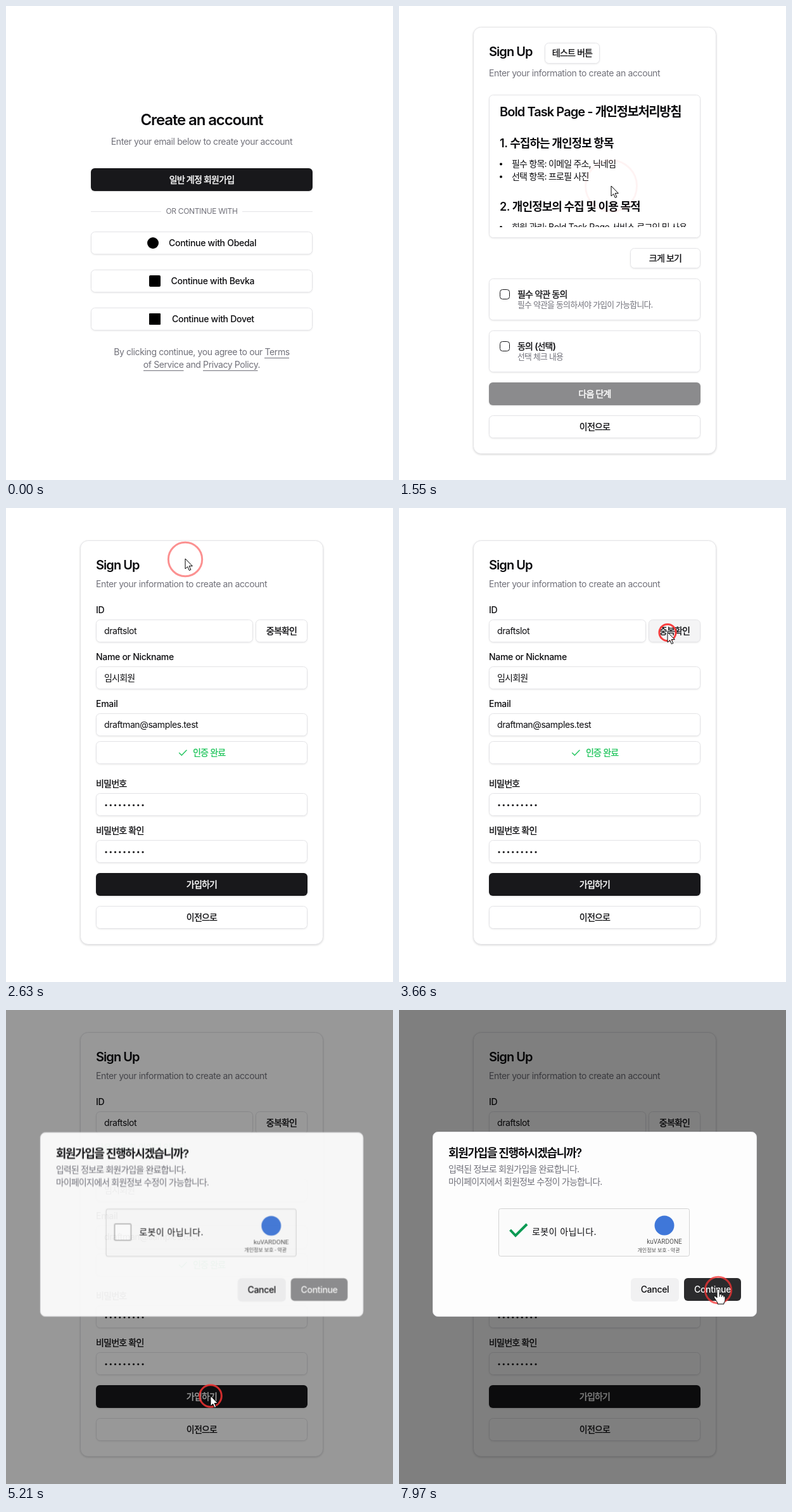
These frames come from a looping animation (611x748 px, 8000 ms). An HTML page:

```html
<!DOCTYPE html>
<html lang="ko">
<head>
<meta charset="utf-8">
<title>Sign up flow</title>
<style>
html, body { margin: 0; width: 100%; height: 100%; overflow: hidden; background: #fff; }
svg { display: block; width: 100vw; height: 100vh; }

/* type */
text { font: 400 14px Inter, "Noto Sans CJK KR", "Noto Sans CJK", sans-serif; letter-spacing: -.028em; fill: currentColor; color: #0c0c0f; }
.mid { text-anchor: middle; }
.m { font-weight: 500; letter-spacing: -.021em; }
.k { letter-spacing: -.056em; }
.k.m { stroke: currentColor; stroke-width: .3px; }
.k.m.white { stroke-width: .45px; }
.h1, .h2, .h3 { font-weight: 600; letter-spacing: -.047em; }
.h1 { font-size: 24px; }
.h2 { font-size: 20px; }
.h3 { font-size: 18px; letter-spacing: -.025em; }
.kt { letter-spacing: -.074em; }
.h3 .kt { letter-spacing: -.052em; }
.mute { color: #71717a; }
.white { color: #fff; }
.green { color: #22c55e; }
.desc { font-size: 12.8px; }
.robot { letter-spacing: .03em; }
.tiny { font-size: 10px; font-family: Roboto, sans-serif; letter-spacing: 0; color: #555; }
.tiny.kr { font-size: 8px; font-family: Roboto, "Noto Sans CJK KR", sans-serif; }

/* shapes */
.box { fill: #fff; stroke: #e4e4e7; filter: drop-shadow(0 1px 1px rgba(0,0,0,.08)); }
.card { filter: drop-shadow(0 1px 1.5px rgba(0,0,0,.16)); }
.dark { fill: #18181b; filter: drop-shadow(0 1px 1px rgba(0,0,0,.12)); }
.off { fill: #8b8b8d; }
.tick { fill: none; stroke: #18181b; }
.line { stroke: #e4e4e7; }
.under { stroke: #71717a; }
.dots { stroke: #0c0c0f; stroke-width: 3.2; stroke-linecap: round; stroke-dasharray: 0 7.25; }
.ok { fill: none; stroke: #22c55e; stroke-width: 1.4; stroke-linecap: round; stroke-linejoin: round; }

/* motion: 1% is 80 ms */
.cut { animation: 8s step-end infinite; }
.run { animation: 8s linear infinite; }

#login { animation-name: login; }
@keyframes login { 0% { opacity: 1 } 10.625%, 100% { opacity: 0 } }

#terms { animation-name: terms; }
@keyframes terms {
  0%, 10.625% { opacity: 0; transform: translateY(10px); animation-timing-function: ease-out }
  14.125%, 29.37% { opacity: 1; transform: translateY(0) }
  29.375%, 100% { opacity: 0; transform: translateY(0) }
}
#form { animation-name: form; }
@keyframes form {
  0%, 29.375% { opacity: 0; transform: translateY(10px); animation-timing-function: ease-out }
  32.875%, 100% { opacity: 1; transform: translateY(0) }
}
#tip { animation-name: tip; transform-origin: 263.5px 38px; }
@keyframes tip {
  0%, 22.5% { opacity: 0; transform: scale(.95) }
  23.625%, 26.625% { opacity: 1; transform: scale(1) }
  28.5%, 100% { opacity: 0; transform: scale(.95) }
}

#startBtn { animation-name: start; }
@keyframes start { 0% { fill: #18181b } 5.2%, 100% { fill: #2b2b2d } }
#testBtn { animation-name: test; }
@keyframes test { 0% { fill: #fff } 21.9%, 100% { fill: #f4f4f5 } }
#dupBtn { animation-name: dup; }
@keyframes dup { 0% { fill: #fff } 41.6% { fill: #f4f4f5 } 46.125%, 100% { fill: #fff } }
#joinBtn { animation-name: join; }
@keyframes join { 0% { fill: #18181b } 59.4% { fill: #2b2b2d } 63.75%, 100% { fill: #18181b } }
#goBtn { animation-name: go; }
@keyframes go { 0% { fill: #8b8b8d } 85.6% { fill: #18181b } 91%, 100% { fill: #2b2b2d } }

/* the availability line pushes the form apart */
#formCard { animation-name: grow; }
@keyframes grow { 0% { y: 51.5px; height: 637px } 46.125%, 100% { y: 35.5px; height: 669px } }
#upper { animation-name: upper; }
@keyframes upper { 0% { transform: translateY(16px) } 46.125%, 100% { transform: translateY(0) } }
#lower { animation-name: lower; }
@keyframes lower { 0% { transform: translateY(-16px) } 46.125%, 100% { transform: translateY(0) } }
#free { animation-name: free; }
@keyframes free { 0% { opacity: 0 } 46.125%, 100% { opacity: 1 } }

#shade { animation-name: shade; }
@keyframes shade { 0%, 63.125% { opacity: 0 } 65.625%, 100% { opacity: .5 } }
#dialog { animation-name: dialog; transform-origin: 309px 338px; }
@keyframes dialog {
  0%, 63.125% { opacity: 0; transform: translateY(8px) scale(.95); animation-timing-function: ease-out }
  65.625%, 100% { opacity: 1; transform: translateY(0) scale(1) }
}
#square { animation-name: square; }
@keyframes square {
  0%, 76.2% { stroke: #c1c1c1; opacity: 1 }
  76.3%, 80.5% { stroke: #a9a9ad; opacity: 1 }
  82%, 100% { stroke: #a9a9ad; opacity: 0 }
}
#done { fill: none; stroke: #0b9a53; stroke-width: 4; stroke-dasharray: 1 2; animation-name: done; }
@keyframes done { 0%, 83% { stroke-dashoffset: 1.05 } 85%, 100% { stroke-dashoffset: 0 } }

/* pointer */
#pointer { animation-name: pointer; }
@keyframes pointer {
  0%, 1.1% { transform: translate(512px, -24px); animation-timing-function: cubic-bezier(.3,.1,.4,1) }
  6.5%, 19.8% { transform: translate(335px, 284px); animation-timing-function: ease-in-out }
  22.25%, 36.6% { transform: translate(283px, 80px); animation-timing-function: ease-in-out }
  42.4%, 52.75% { transform: translate(424px, 196px); animation-timing-function: ease-in-out }
  56.625% { transform: translate(349px, 560px); animation-timing-function: ease-out }
  60.75%, 71.125% { transform: translate(323px, 609px); animation-timing-function: ease-in }
  73.5% { transform: translate(300px, 465px) }
  75% { transform: translate(230px, 395px); animation-timing-function: ease-out }
  77.2%, 87.625% { transform: translate(181px, 349px); animation-timing-function: ease-in }
  88.6% { transform: translate(300px, 385px) }
  89.3% { transform: translate(375px, 396px) }
  90.3% { transform: translate(455px, 406px); animation-timing-function: ease-out }
  91.875%, 100% { transform: translate(504px, 441px) }
}
#pointer path { fill: #fff; stroke: #000; stroke-linejoin: round; }
#arrow { animation-name: arrow; }
@keyframes arrow {
  0% { opacity: 1 } 5.2% { opacity: 0 } 10.625% { opacity: 1 } 21.9% { opacity: 0 }
  29.375% { opacity: 1 } 41.6% { opacity: 0 } 44.5% { opacity: 1 } 59.4% { opacity: 0 }
  63.75% { opacity: 1 } 91%, 100% { opacity: 0 }
}
#hand { animation-name: hand; }
@keyframes hand {
  0% { opacity: 0 } 5.2% { opacity: 1 } 10.625% { opacity: 0 } 21.9% { opacity: 1 }
  29.375% { opacity: 0 } 41.6% { opacity: 1 } 44.5% { opacity: 0 } 59.4% { opacity: 1 }
  63.75% { opacity: 0 } 91%, 100% { opacity: 1 }
}

/* click rings */
.ring { r: 0; opacity: 0; fill: none; stroke: #f93434; stroke-width: 3; animation: ring 8s linear infinite; }
@keyframes ring {
  0% { r: 0px; opacity: 1 }
  3% { r: 13px; opacity: .95 }
  5% { r: 21.5px; opacity: .72 }
  10% { r: 42px; opacity: 0 }
  100% { r: 0px; opacity: 0 }
}
.ring.last { animation-name: ringLast; }
@keyframes ringLast {
  0%, 94.6% { r: 0px; opacity: 0 }
  94.61% { r: 0px; opacity: 1 }
  97.6% { r: 13px; opacity: .95 }
  100% { r: 22px; opacity: .7 }
}
</style>
</head>
<body>
<svg viewBox="0 0 611 748">
  <defs>
    <clipPath id="scroll"><rect x="142" y="140" width="334" height="209"/></clipPath>
  </defs>

  <g id="login" class="cut">
    <text class="h1 mid" x="309" y="188">Create an account</text>
    <text class="mute mid" x="309" y="219">Enter your email below to create your account</text>
    <rect id="startBtn" class="dark cut" x="134" y="256" width="350" height="36" rx="6"/>
    <text class="k m white mid" x="309" y="279">일반 계정 회원가입</text>
    <path class="line" d="M134 324.5H245M373 324.5H484"/>
    <text class="mute mid" style="font-size:12px" x="309" y="328">OR CONTINUE WITH</text>
    <rect class="box" x="134.5" y="356.5" width="349" height="35" rx="6"/>
    <circle cx="232" cy="374" r="9"/>
    <text class="m" x="257" y="379">Continue with Obedal</text>
    <rect class="box" x="134.5" y="416.5" width="349" height="35" rx="6"/>
    <rect x="226" y="425" width="18" height="18" rx="2"/>
    <text class="m" x="260.5" y="439">Continue with Bevka</text>
    <rect class="box" x="134.5" y="476.5" width="349" height="35" rx="6"/>
    <rect x="226" y="485" width="18" height="18" rx="1"/>
    <text class="m" x="262" y="499">Continue with Dovet</text>
    <text class="mute mid" x="309" y="551">By clicking continue, you agree to our Terms</text>
    <text class="mute mid" x="309" y="571">of Service and Privacy Policy.</text>
    <path class="under" d="M408 555.5H447M217 575.5H280.5M311 575.5H397.5"/>
  </g>

  <g id="terms" class="run">
    <rect class="box card" x="117.5" y="33.5" width="383" height="673" rx="12"/>
    <text class="h2" x="142" y="79">Sign Up</text>
    <rect id="testBtn" class="box cut" x="230.5" y="58.5" width="86" height="32" rx="6"/>
    <text class="k m mid" x="273.5" y="79">테스트 버튼</text>
    <text class="mute" x="142" y="111">Enter your information to create an account</text>

    <rect class="box" x="142.5" y="140.5" width="333" height="225" rx="6"/>
    <g clip-path="url(#scroll)">
      <text class="h2" x="159" y="174">Bold Task Page - <tspan class="kt">개인정보처리방침</tspan></text>
      <text class="h3" x="159" y="222.5">1. <tspan class="kt">수집하는 개인정보 항목</tspan></text>
      <circle cx="161" cy="249.5" r="2"/>
      <text class="k" x="178" y="254">필수 항목: 이메일 주소, 닉네임</text>
      <circle cx="161" cy="269.5" r="2"/>
      <text class="k" x="178" y="274">선택 항목: 프로필 사진</text>
      <text class="h3" x="159" y="322.5">2. <tspan class="kt">개인정보의 수집 및 이용 목적</tspan></text>
      <circle cx="161" cy="349" r="2"/>
      <text x="178" y="354"><tspan class="k">회원 관리: </tspan>Bold Task Page <tspan class="k">서비스 로그인 및 사용</tspan></text>
    </g>
    <rect class="box" x="365.5" y="382.5" width="110" height="31" rx="6"/>
    <text class="k m mid" x="420.5" y="403">크게 보기</text>

    <rect class="box" x="142.5" y="430.5" width="333" height="65" rx="6"/>
    <rect class="tick" x="159.5" y="447.5" width="15" height="15" rx="4"/>
    <text class="k m" x="187" y="460">필수 약관 동의</text>
    <text class="k desc mute" x="187" y="475.5">필수 약관을 동의하셔야 가입이 가능합니다.</text>
    <rect class="box" x="142.5" y="512.5" width="333" height="65" rx="6"/>
    <rect class="tick" x="159.5" y="529.5" width="15" height="15" rx="4"/>
    <text class="k m" x="187" y="542">동의 (선택)</text>
    <text class="k desc mute" x="187" y="557.5">선택 체크 내용</text>

    <rect class="dark off" x="142" y="594" width="334" height="36" rx="6"/>
    <text class="k m white mid" x="309" y="617">다음 단계</text>
    <rect class="box" x="142.5" y="646.5" width="333" height="35" rx="6"/>
    <text class="k m mid" x="309" y="669">이전으로</text>
  </g>

  <g id="tip" class="run">
    <rect x="114" y="22" width="299" height="32" rx="6" fill="#18181b"/>
    <text class="k m white mid" x="263.5" y="43">누르면 즉시 회원가입 테스트 직전까지 셋팅됩니다.</text>
  </g>

  <g id="form" class="run">
    <rect id="formCard" class="box card cut" x="117.5" y="35.5" width="383" height="669" rx="12"/>
    <g id="upper" class="cut">
      <text class="h2" x="142" y="81">Sign Up</text>
      <text class="mute" x="142" y="109">Enter your information to create an account</text>
      <text class="m" x="142" y="150">ID</text>
      <rect class="box" x="142.5" y="160.5" width="247" height="35" rx="6"/>
      <text x="155" y="183">draftslot</text>
      <rect id="dupBtn" class="box cut" x="394.5" y="160.5" width="81" height="35" rx="6"/>
      <text class="k m mid" x="435" y="183">중복확인</text>
    </g>
    <text id="free" class="k green cut" x="142" y="222">사용 가능한 아이디 입니다.</text>
    <g id="lower" class="cut">
      <text class="m" x="142" y="256">Name or Nickname</text>
      <rect class="box" x="142.5" y="266.5" width="333" height="35" rx="6"/>
      <text class="k" x="155" y="289">임시회원</text>
      <text class="m" x="142" y="330">Email</text>
      <rect class="box" x="142.5" y="340.5" width="333" height="35" rx="6"/>
      <text x="155" y="363">draftman@samples.test</text>
      <rect class="box" x="142.5" y="384.5" width="333" height="35" rx="6"/>
      <path class="ok" d="M273.5 402.5l3.800 3.800 7.700-8"/>
      <text class="k m green" x="295" y="407">인증 완료</text>
      <text class="k m" x="142" y="456">비밀번호</text>
      <rect class="box" x="142.5" y="466.5" width="333" height="35" rx="6"/>
      <path class="dots" d="M158 485h58.2"/>
      <text class="k m" x="142" y="530">비밀번호 확인</text>
      <rect class="box" x="142.5" y="540.5" width="333" height="35" rx="6"/>
      <path class="dots" d="M158 559h58.2"/>
      <rect id="joinBtn" class="dark cut" x="142" y="592" width="334" height="36" rx="6"/>
      <text class="k m white mid" x="309" y="615">가입하기</text>
      <rect class="box" x="142.5" y="644.5" width="333" height="35" rx="6"/>
      <text class="k m mid" x="309" y="667">이전으로</text>
    </g>
  </g>

  <rect id="shade" class="run" width="611" height="748"/>

  <g id="dialog" class="run">
    <rect x="53.5" y="192.5" width="511" height="291" rx="8" fill="#fdfdfd" stroke="#e4e4e7"/>
    <text class="h3 kt" x="78" y="232">회원가입을 진행하시겠습니까?</text>
    <text class="k mute" x="78" y="256">입력된 정보로 회원가입을 완료합니다.</text>
    <text class="k mute" x="78" y="276">마이페이지에서 회원정보 수정이 가능합니다.</text>

    <rect x="157.5" y="313.5" width="301" height="75" rx="3" fill="#fbfbfb" stroke="#d3d3d3"/>
    <rect id="square" class="run" x="171" y="337" width="26" height="26" rx="2" fill="#fff" stroke-width="2"/>
    <path id="done" class="run" pathLength="1" d="M175.5 347l8.500 9 18-18"/>
    <text class="robot" x="210" y="355">로봇이 아닙니다.</text>
    <circle cx="419" cy="340" r="15.5" fill="#3f77d9"/>
    <text class="tiny mid" x="419" y="369">kuVARDONE</text>
    <text class="tiny kr mid" x="410" y="381.5">개인정보 보호 - 약관</text>

    <rect x="366" y="423" width="76" height="37" rx="6" fill="#f1f1f2"/>
    <text class="m mid" x="404" y="446">Cancel</text>
    <rect id="goBtn" class="cut" x="450" y="423" width="90" height="36" rx="6"/>
    <text class="m white mid" x="495" y="446">Continue</text>
  </g>

  <circle class="ring" cx="335" cy="284" style="animation-delay:780ms"/>
  <circle class="ring" cx="283" cy="81" style="animation-delay:2130ms"/>
  <circle class="ring" cx="424" cy="196.5" style="animation-delay:3420ms"/>
  <circle class="ring" cx="323" cy="609" style="animation-delay:4890ms"/>
  <circle class="ring" cx="181" cy="350" style="animation-delay:6205ms"/>
  <circle class="ring last" cx="504" cy="442"/>

  <g id="pointer" class="run">
    <path id="arrow" class="cut" d="M0 0V16l3.700-3.400 2.600 5.900 2.500-1.100-2.600-5.800h5.100z"/>
    <g id="hand" class="cut">
      <path d="M-2 1.500a2 2 0 0 1 4 0V7.500q3-.6 3.500 1.200q2.800-.4 3.200 1.400q2-.2 2.300 2V16q0 3-2 5v2H-1v-2l-5-7.500q-1.400-2.400.4-3q1.600-.3 3.600 2.500z"/>
      <path d="M2 7.500v4M5.500 8.700v3M8.700 10.100v2.200" fill="none"/>
    </g>
  </g>
</svg>
</body>
</html>
```
